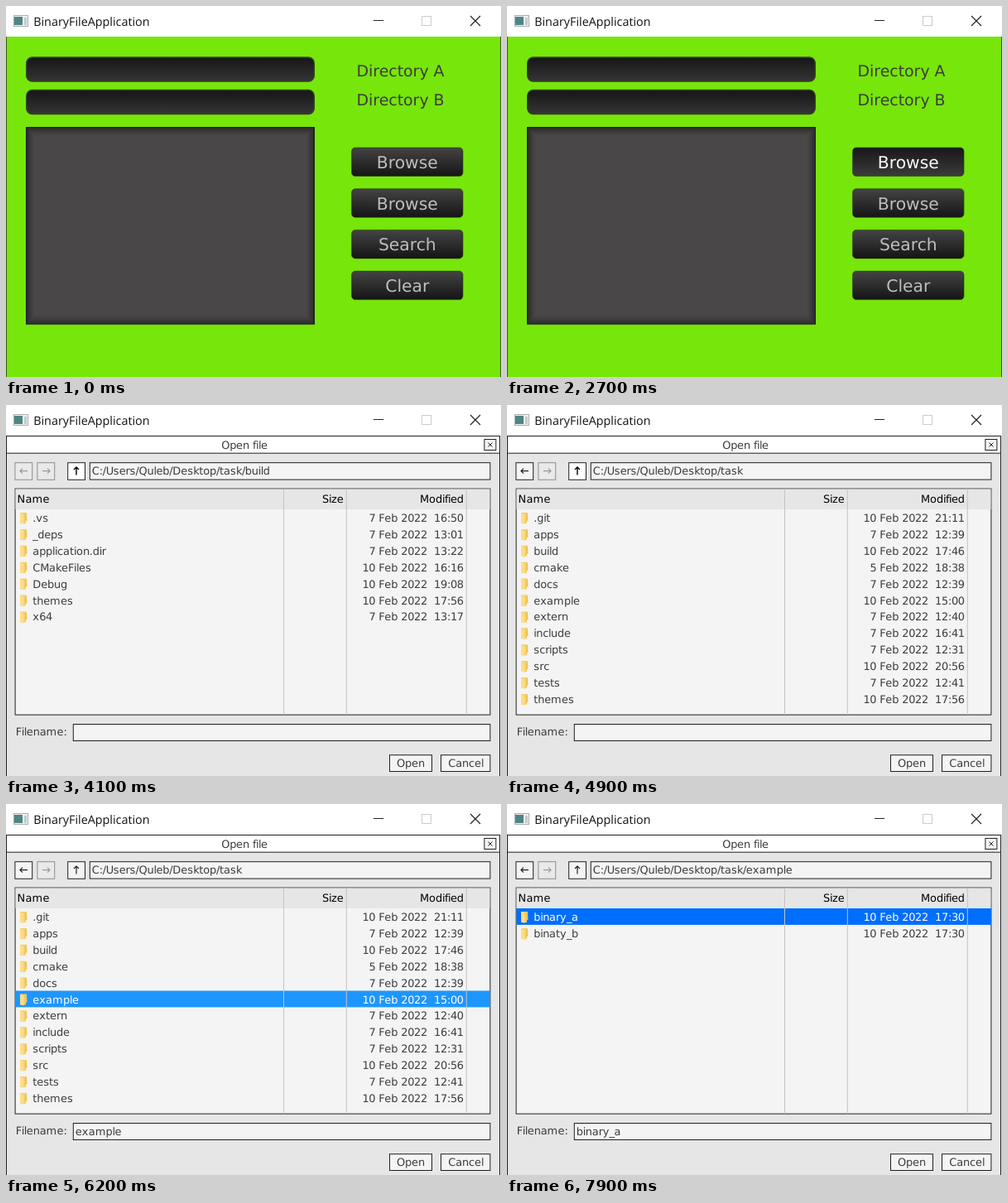
Write an HTML page that moves like this. It is 598 px wide and 448 px high and loops after 8000 ms.

```html
<!DOCTYPE html>
<html lang="en">
<head>
<meta charset="utf-8">
<title>File search window</title>
<style>
  html, body { margin: 0; width: 100%; height: 100%; overflow: hidden; background: #fff; }
  svg { display: block; width: 598px; height: 448px; }
  text { font-family: "DejaVu Sans", sans-serif; white-space: pre; text-rendering: geometricPrecision; }
  .caption { font-family: "Open Sans", "Noto Sans", sans-serif; }
</style>
</head>
<body>
<svg id="stage" viewBox="0 0 598 448" xmlns="http://www.w3.org/2000/svg"></svg>
<script>
const stage = document.getElementById('stage');
const LOOP = 8000;
const ZOOM = .995;          // the window is shown slightly reduced
const ROW = 20 * ZOOM;
const INK = '#3c3c3c', PALE = '#f4f4f4', LINE = '#202020';
const HOME = 'C:/Users/Quleb/Desktop/task';

const folders = {
  build: ['/build', [
    ['.vs', '7 Feb 2022  16:50'], ['_deps', '7 Feb 2022  13:01'],
    ['application.dir', '7 Feb 2022  13:22'], ['CMakeFiles', '10 Feb 2022  16:16'],
    ['Debug', '10 Feb 2022  19:08'], ['themes', '10 Feb 2022  17:56'],
    ['x64', '7 Feb 2022  13:17']]],
  task: ['', [
    ['.git', '10 Feb 2022  21:11'], ['apps', '7 Feb 2022  12:39'],
    ['build', '10 Feb 2022  17:46'], ['cmake', '5 Feb 2022  18:38'],
    ['docs', '7 Feb 2022  12:39'], ['example', '10 Feb 2022  15:00'],
    ['extern', '7 Feb 2022  12:40'], ['include', '7 Feb 2022  16:41'],
    ['scripts', '7 Feb 2022  12:31'], ['src', '10 Feb 2022  20:56'],
    ['tests', '7 Feb 2022  12:41'], ['themes', '10 Feb 2022  17:56']]],
  example: ['/example', [
    ['binary_a', '10 Feb 2022  17:30'], ['binaty_b', '10 Feb 2022  17:30']]]
};

// Each step changes part of the state from its time on.
const steps = [
  [0, { dir: null, button: 'idle', up: false, hover: -1, picked: -1 }],
  [1700, { button: 'hover' }],
  [2300, { button: 'down' }],
  [2900, { dir: 'build', button: 'idle' }],
  [3500, { hover: 2 }],
  [3600, { hover: 0 }],
  [3700, { hover: -1, up: true }],
  [4800, { dir: 'task' }],
  [5400, { up: false }],
  [5500, { hover: 0 }],
  [5600, { hover: 1 }],
  [5700, { hover: 3 }],
  [5800, { hover: 4 }],
  [5900, { hover: 5 }],
  [6100, { picked: 5 }],
  [6300, { dir: 'example', hover: -1, picked: -1 }],
  [6700, { hover: 1 }],
  [6900, { hover: 0 }],
  [7500, { picked: 0 }],
  [7700, { hover: -1 }]
];

const rect = (x, y, w, h, fill, more = '') =>
  `<rect x="${x}" y="${y}" width="${w}" height="${h}" fill="${fill}" ${more}/>`;
// A bordered box given by its outer edges.
const box = (left, top, right, bottom, fill, line = LINE) =>
  rect(left + .5, top + .5, right - left - 1, bottom - top - 1, fill, `stroke="${line}"`);
const path = (d, color, width = 1) =>
  `<path d="${d}" fill="none" stroke="${color}" stroke-width="${width}"/>`;
const shape = (d, fill) => `<path d="${d}" fill="${fill}"/>`;
const text = (s, x, y, size, color, more = '') =>
  `<text x="${x}" y="${y}" font-size="${size}" fill="${color}" ${more}>${s}</text>`;

// Small labels use whole-pixel glyph advances before the reduction.
const pen = document.createElement('canvas').getContext('2d');
const advances = {};
function advance(c) {
  if (!(c in advances)) {
    pen.font = '1000px "DejaVu Sans", sans-serif';
    advances[c] = ZOOM * Math.round(pen.measureText(c).width * .013 - .15);
  }
  return advances[c];
}
function label(s, x, y, color = INK, align = 0) {
  const width = [...s].reduce((sum, c) => sum + advance(c), 0);
  let at = x - width * align;
  const xs = [...s].map(c => { const here = at; at += advance(c); return here.toFixed(2); });
  return text(s, xs.join(' '), y, 13 * ZOOM, color);
}

function gradient(id, top, bottom) {
  return `<linearGradient id="${id}" x2="0" y2="1"><stop stop-color="${top}"/>` +
    `<stop offset="1" stop-color="${bottom}"/></linearGradient>`;
}
const defs = '<defs>' + gradient('idle', '#444', '#151515') +
  gradient('hover', '#555', '#222') + gradient('down', '#181818', '#3b3b3b') +
  gradient('field', '#161616', '#353535') + '</defs>';

function titleBar() {
  return rect(0, 0, 598, 37, '#fff') +
    box(9, 11, 27, 25, '#f2f2f2', '#a5adb1') +
    rect(10, 13, 10, 10, '#4f8585') + rect(22, 14, 3, 9, '#c3cacd') +
    text('BinaryFileApplication', 33.2, 23.5, 14.35, '#111', 'class="caption"') +
    path('M444 17.5H456', '#222') +
    box(502, 12, 514, 24, 'none', '#ccc') +
    path('M561 12L573 24M573 12L561 24', '#222', 1.2);
}

function blackButton(i, name, mode) {
  const y = 171 + i * 49.7;
  return rect(417.5, y, 134.5, 34.5, `url(#${mode})`, 'rx="4.5" stroke="#2c3a1c" stroke-width=".6"') +
    text(name, 484.8, y + 24.8, 20.3, mode === 'idle' ? '#bebebe' : '#fafafa', 'text-anchor="middle"');
}

function mainView(s) {
  let out = rect(0, 37, 598, 411, '#77e60b');
  for (const y of [62, 101.5])
    out += rect(24.7, y, 347.6, 29, 'url(#field)', 'rx="7" stroke="#34421f" stroke-width="1.4"');
  out += rect(24, 146, 349, 238.5, '#494747');
  for (let i = 0; i < 11; i++)
    out += rect(24.5 + i, 146.5 + i, 348 - 2 * i, 237.5 - 2 * i, 'none',
      `stroke="#161616" stroke-opacity="${(i ? .62 * (1 - i / 11) ** 1.4 : .85).toFixed(2)}"`);
  out += text('Directory A', 423.5, 84.5, 18.9, INK) + text('Directory B', 423.5, 119.5, 18.9, INK);
  ['Browse', 'Browse', 'Search', 'Clear'].forEach((name, i) => {
    out += blackButton(i, name, i ? 'idle' : s.button);
  });
  return out + rect(0, 37, 1, 411, '#3a5a1a') + rect(597, 37, 1, 411, '#3a5a1a');
}

function arrowButton(x, d, on, hot) {
  return box(x, 69.2, x + 21.8, 90.8, hot ? '#fff' : on ? PALE : '#e9e9e9', on ? LINE : '#8c8c8c') +
    path(d, hot ? '#000' : on ? '#222' : '#999', hot ? 1.4 : 1.2);
}

function folderIcon(y) {
  return shape(`M17 ${y + 4}h8l.5 9.5l-1.5 1v2.5h-7z`, '#f3cd68') +
    shape(`M17 ${y + 4}l4.5 2v12l-4.5 -1.5z`, '#fbdd88') +
    rect(23.5, y + 5.5, 1.2, 8, '#e9bd52');
}

function fileRow([name, date], i, s) {
  const y = 126 + i * ROW, hot = i === s.hover, picked = i === s.picked;
  const color = picked ? '#fff' : hot ? '#000' : INK;
  const back = picked ? (hot ? '#1e96ff' : '#006eff') : '#fff';
  return (hot || picked ? rect(11.5, y, 573.5, ROW, back) : '') + folderIcon(y) +
    label(name, 32.2, y + 15, color) + label(date, 552.8, y + 15, color, 1);
}

function dialog(s) {
  const [tail, rows] = folders[s.dir];
  const moved = s.dir !== 'build';
  const right = 585.4;
  let out = rect(0, 37, 598, 411, '#e6e6e6') +
    box(0, 37, 597, 58.7, '#fff') + label('Open file', 260.2, 52.7) +
    box(577.4, 41, 592.4, 55, PALE) + path('M582.5 45.5L587.5 50.5M587.5 45.5L582.5 50.5', '#222') +
    arrowButton(10.4, 'M26 79.7H17M20 76.7L17 79.7L20 82.7', moved, false) +
    arrowButton(37.4, 'M44 79.7H53M50 76.7L53 79.7L50 82.7', false, false) +
    arrowButton(74.2, 'M85 84.5V75M82 78L85 75L88 78', true, s.up) +
    box(100.8, 69.2, right, 90.6, PALE) + label(HOME + tail, 103.8, 84.2);
  out += box(10.6, 100.6, right, 374.6, PALE) + rect(11.5, 101.5, 573, 24.5, '#e6e6e6') +
    label('Name', 13.6, 118, '#000') + label('Size', 407.8, 118, '#000', 1) +
    label('Modified', 552.8, 118, '#000', 1);
  out += rows.map((row, i) => fileRow(row, i, s)).join('');
  for (const x of [335, 410.8, 555.8]) out += rect(x, 101.5, 1, 272.5, '#c4c4c4');
  out += label('Filename:', 11.8, 399.3) + box(80.8, 385, right, 406, PALE) +
    (s.picked < 0 ? '' : label(rows[s.picked][0], 83.8, 400)) +
    box(463, 422.2, 515, 443, PALE) + label('Open', 489, 437, INK, .5) +
    box(525, 422.2, right, 443, PALE) + label('Cancel', 555.6, 437, INK, .5);
  return out + rect(0, 37, 1, 411, LINE) + rect(596, 37, 1, 411, LINE);
}

let shown = '';
function draw(ms) {
  const s = {};
  for (const [at, change] of steps) if (ms >= at) Object.assign(s, change);
  const key = JSON.stringify(s);
  if (key === shown) return;
  shown = key;
  stage.innerHTML = defs + titleBar() + (s.dir ? dialog(s) : mainView(s));
}

const start = performance.now();
function tick() {
  draw((performance.now() - start) % LOOP);
  requestAnimationFrame(tick);
}
tick();
</script>
</body>
</html>
```
